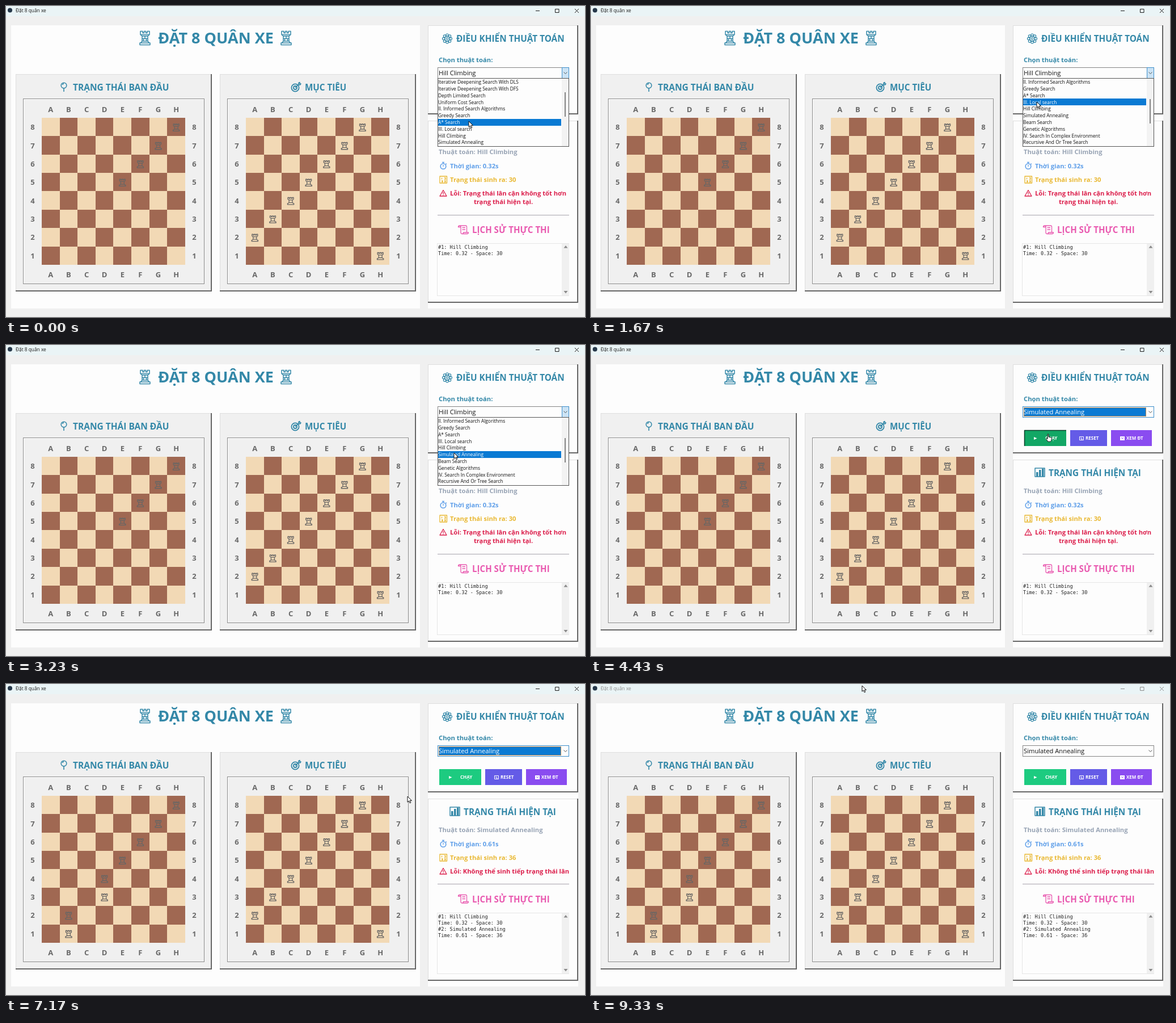
Write an HTML page with a canvas that moves like this. It is 1021 px wide and 548 px high and loops after 9.36 s.

```html
<!DOCTYPE html>
<html lang="vi">
<head>
<meta charset="utf-8">
<title>Đặt 8 quân xe</title>
<style>
html, body { margin: 0; width: 100%; height: 100%; overflow: hidden; background: #f0f0f0; }
canvas { display: block; }
</style>
</head>
<body>
<canvas id="stage" width="1021" height="548"></canvas>
<script>
const ctx = document.getElementById('stage').getContext('2d');
const LOOP = 9360, SCROLL = 520, PICK = 3560, HOVER = 4150, PRESS = 4360, RUN = 4500, DONE = 5110, LEAVE = 4900, BLUR = 9200;
const SANS = '"Open Sans", "Noto Sans", sans-serif', MONO = '"DejaVu Sans Mono", monospace';
const TEAL = '#3488a8', WHITE = '#fdfdfd', GREY = '#f0f0f0', BLUE = '#0a7ad3', PINK = '#e95ab0';

const ITEMS = ['Iterative Deepening Search With DLS', 'Iterative Deepening Search With DFS',
  'Depth Limited Search', 'Uniform Cost Search', 'II. Informed Search Algorithms', 'Greedy Search',
  'A* Search', 'III. Local search', 'Hill Climbing', 'Simulated Annealing', 'Beam Search',
  'Genetic Algorithms', 'IV. Search In Complex Environment', 'Recursive And Or Tree Search'];
const ROW = 11.78, LIST_TOP = 128.1;

// Column of the rook in each rank, from rank 8 down
const START = [7, 6, 5, 4, 3, 3, 1, 1], GOAL = [6, 5, 4, 3, 2, 1, 0, 7];

// Pointer tip: time, x, y
const POINTER = [[0, 816, 203], [560, 816, 203], [1300, 786, 169], [1750, 786, 169], [2900, 790, 190],
  [3600, 790, 190], [4200, 806, 157], [4600, 806, 157], [5350, 829, 220], [5900, 829, 220],
  [6900, 708, 198], [7900, 708, 198], [9150, 478, 3], [LOOP, 478, 3]];

const ROOK = 'M-5-6h2.2v1.6h1.7v-1.6h2.2v1.6h1.7v-1.6h2.2v3l-2 1.4v4.6l1.6 1.4h1v2h-11.2v-2h1l1.6-1.4v-4.6l-2-1.4z' +
  'M-3-1.6h6M-3 3h6';
const TOWER = 'M-8-12h4v3h2.5v-3h3v3h2.5v-3h4v6l-3 2.5v9l2.5 3h1.5v3.5h-18v-3.5h1.5l2.5-3v-9l-3-2.5z' +
  'M-7-6h14M-5-3.5h10M-5 1h10M-5 5.5h10M0-3.5v4.5M-2.5 1v4.5M2.5 1v4.5M-7 8.5h14';
const SCROLL_ICON = 'M800-7.5h10.5q2 0 2 2v10M800-7.5q-2.5 0-2.5 2.5h4.5v9.5q0 2.5 2.5 2.5h8.5q2.5 0 2.5-2.5h-9' +
  'q0 2.5-2 2.5M800-7.5q2 0 2 2.5M804.5-4h5.5M804.5-.5h5.5';
const ARROW = 'M0 0v10.2l2.4-2.2 1.7 3.8 1.8-.8-1.7-3.6h3.2z';
const HAND = 'M-.9.3q.9-1 1.8 0v4.6l4.6 1.2q1 .4.8 1.6l-.7 3.8-1.2 1.7h-4.6l-3.2-4.6q-.3-1.4 1-1.2l1.5 1.2z';

function box(x, y, w, h, color) {
  ctx.fillStyle = color;
  ctx.fillRect(x, y, w, h);
}

function outline(x, y, w, h, color) {
  ctx.strokeStyle = color;
  ctx.lineWidth = 1;
  ctx.strokeRect(x + .5, y + .5, w - 1, h - 1);
}

function text(s, x, middle, size, color, { weight = 700, align = 'left', family = SANS } = {}) {
  ctx.font = `${weight} ${size}px ${family}`;
  ctx.textAlign = align;
  ctx.fillStyle = color;
  ctx.fillText(s, x, middle + size * .357);
}

function shape(d, x, y, { stroke, fill, width = 1.3 }) {
  const path = new Path2D(d);
  ctx.save();
  ctx.translate(x, y);
  ctx.lineWidth = width;
  ctx.lineJoin = 'round';
  if (fill) { ctx.fillStyle = fill; ctx.fill(path); }
  if (stroke) { ctx.strokeStyle = stroke; ctx.stroke(path); }
  ctx.restore();
}

function ring(x, y, r, color, width = 1.4) {
  ctx.beginPath();
  ctx.arc(x, y, r, 0, 2 * Math.PI);
  ctx.strokeStyle = color;
  ctx.lineWidth = width;
  ctx.stroke();
}

function dot(x, y, r, color) {
  ctx.beginPath();
  ctx.arc(x, y, r, 0, 2 * Math.PI);
  ctx.fillStyle = color;
  ctx.fill();
}

function raised(x, y, w, h, face) {
  box(x, y, w, h, '#585858');
  box(x, y, w - 1, h - 1, '#747474');
  box(x, y, w - 2, h - 2, '#dedede');
  box(x + 1, y + 1, w - 3, h - 3, face);
}

function titleBar(active) {
  const ink = active ? '#1c1c1c' : '#8c8c8c';
  box(0, 0, 1021, 18, '#eaf4f6');
  dot(7, 7.5, 4, '#26384a');
  text('Đặt 8 quân xe', 17, 8.5, 8.35, ink, { weight: 400 });
  shape('M934 8.5h7M968.5 5.5h6.5v6h-6.5zM1003 5l7 7M1010 5l-7 7', 0, 0, { stroke: ink, width: 1 });
}

function board(left, rooks, shown) {
  const cw = 31.62, ch = 32.36, top = 197;
  raised(left - 46, 120, 346, 383, GREY);
  outline(left - 32, 164, 319, 326, '#fff');
  outline(left - 33, 163, 320, 327, '#8c8c8c');
  for (let r = 0; r < 8; r++) {
    const cy = top + (r + .5) * ch + .5, cx = left + (r + .5) * cw;
    for (let c = 0; c < 8; c++) {
      const x = Math.round(left + c * cw), y = Math.round(top + r * ch);
      box(x, y, Math.round(left + (c + 1) * cw) - x, Math.round(top + (r + 1) * ch) - y,
        (r + c) % 2 ? '#a06852' : '#f2d9b5');
    }
    for (const x of [left - 16, left + 269]) text(8 - r, x, cy, 13, '#696969', { align: 'center' });
    for (const y of [182, 473]) text('ABCDEFGH'[r], cx, y, 13, '#696969', { align: 'center' });
  }
  rooks.slice(0, shown).forEach((c, r) =>
    shape(ROOK, left + (c + .5) * cw, top + (r + .5) * ch + .8, { stroke: '#686664' }));
}

function mainPanel(t) {
  box(9, 34, 721, 499, WHITE);
  for (const x of [245, 494]) shape(TOWER, x, 56.5, { stroke: TEAL, width: 1.5 });
  text('ĐẶT 8 QUÂN XE', 370, 56.5, 27, TEAL, { align: 'center' });
  const steps = Math.max(0, Math.min(4, Math.floor((t - RUN) / (DONE - RUN) * 4)));
  board(63, START, 4 + steps);
  board(423, GOAL, 8);
  ring(102, 140, 4.8, TEAL, 1.6);
  shape('M102 145v6M99.5 139q.5-2 2.5-2.2', 0, 0, { stroke: TEAL, width: 1.6 });
  text('TRẠNG THÁI BAN ĐẦU', 118, 143.5, 15.5, TEAL);
  ring(510, 144, 6.6, TEAL, 1.8);
  ring(510, 144, 3, TEAL, 1.8);
  shape('M510 144l6-6v-2.5l2-1v2.5h2l-1.5 2H516', 0, 0, { stroke: TEAL, width: 1.6 });
  text('MỤC TIÊU', 527, 143.5, 15.2, TEAL);
}

function gear() {
  for (let i = 0; i < 8; i++) {
    const a = i * Math.PI / 4;
    ring(778 + 6.3 * Math.cos(a), 57.5 + 6.3 * Math.sin(a), 2.2, TEAL, 1.2);
  }
  ring(778, 57.5, 4.6, TEAL, 1.4);
  ring(778, 57.5, 1.8, TEAL, 1.2);
}

function combo(t) {
  const open = t < PICK, focused = !open && t < BLUR;
  box(761, 108, 232, 20, WHITE);
  outline(761, 108, 232, 20, focused ? '#3f8fca' : '#858585');
  if (focused) {
    box(763, 110, 216, 16, BLUE);
    outline(763, 110, 216, 16, '#b98b57');
  }
  if (open) {
    box(980, 108, 13, 20, '#cbe3f5');
    outline(980, 108, 13, 20, '#3f8fca');
  }
  shape('M983.5 116.5l3 3 3-3', 0, 0, { stroke: '#555', width: 1 });
  text(open ? 'Hill Climbing' : 'Simulated Annealing', 763, 118.5, 11.2, focused ? '#fff' : '#111', { weight: 400 });
}

function button(x, w, color, label, labelX) {
  box(x, 150, w, 28, color);
  text(label, labelX, 164.5, 8, '#fff');
}

function controls(t) {
  raised(744, 34, 265, 157, WHITE);
  gear();
  text('ĐIỀU KHIỂN THUẬT TOÁN', 794, 57.5, 15.35, TEAL);
  text('Chọn thuật toán:', 763, 95, 11.25, TEAL);
  combo(t);
  button(764, 74, t >= HOVER && t < LEAVE ? '#12a765' : '#1dcb80', 'CHẠY', 801);
  if (t >= PRESS && t < RUN) shape('M764.5 178v-27.5h73.5', 0, 0, { stroke: '#0b3d28', width: 1.5 });
  shape('M781 162l5.5 2.5-5.5 2.5z', 0, 0, { fill: '#fff' });
  button(845, 65, '#645be7', 'RESET', 872);
  shape('M861.5 161.5h7v6h-7zM863 164h3M864 166h3', 0, 0, { stroke: '#fff', width: 1 });
  button(917, 72, '#8a4cf0', 'XEM ĐT', 944);
  shape('M933 161h8v7h-8z', 0, 0, { fill: '#fff' });
  shape('M935 163l2 2 2-2', 0, 0, { stroke: '#8a4cf0', width: 1 });
}

function statusIcons() {
  shape('M783 217h17v15h-17z', 0, 0, { stroke: TEAL, width: 1.5 });
  shape('M785 224h3.5v8H785zM790 220h3.5v12H790zM795 218h3.5v14H795z', 0, 0, { fill: TEAL });
  const blue = '#5f9fe9', gold = '#e9b832', red = '#dc1f4c';
  ring(771, 282.5, 4.8, blue, 1.6);
  shape('M771 283v-3M769 275.5h4M771 275.5v2M775.5 277.5l1.5 1.5', 0, 0, { stroke: blue });
  shape('M765 300h12.5v12h-12.5z', 0, 0, { stroke: gold });
  shape('M768.5 302.5v3M773 302.5h2v3h-2M768 308h2v2h-2M773 308h2v2h-2', 0, 0, { stroke: gold });
  shape('M771 324.5l6 10.5h-12zM771 328v3.5M771 332.5v1.3', 0, 0, { stroke: red });
  return { blue, gold, red };
}

function status(t) {
  const done = t >= DONE, shift = done ? -15.5 : 0, size = 11.2;
  raised(744, 202, 265, 321, WHITE);
  const { blue, gold, red } = statusIcons();
  text('TRẠNG THÁI HIỆN TẠI', 807, 225.5, 15.35, TEAL);
  text('Thuật toán: ' + (done ? 'Simulated Annealing' : 'Hill Climbing'), 763, 257.5, size, '#98a4b5');
  text(`Thời gian: ${done ? '0.61' : '0.32'}s`, 783, 282, size, blue);
  text(`Trạng thái sinh ra: ${done ? 36 : 30}`, 783, 306, size, gold);
  if (done) {
    ctx.save();
    ctx.beginPath();
    ctx.rect(761, 318, 233, 26);
    ctx.clip();
    text('Lỗi: Không thể sinh tiếp trạng thái lân', 783, 330.5, size, red);
    ctx.restore();
  } else {
    text('Lỗi: Trạng thái lân cận không tốt hơn', 783, 330.5, size, red);
    text('trạng thái hiện tại.', 877, 345.5, size, red, { align: 'center' });
  }
  box(761, Math.round(367.5 + shift), 232, 1, '#a7a3ad');

  const y = 394.5 + shift;
  shape(SCROLL_ICON, 0, y, { stroke: PINK });
  text('LỊCH SỬ THỰC THI', 822, y + .5, 15.1, PINK);
  history(done, Math.round(418 + shift));
}

function history(done, top) {
  box(760, top, 233, 511 - top, '#e6e6e6');
  box(761, top + 1, 219, 509 - top, WHITE);
  box(980, top + 1, 13, 509 - top, '#f0f0f0');
  shape('M983.5 2.5l3.5-4.5 3.5 4.5z', 0, top + 6, { fill: '#8a8a8a' });
  shape('M983.5-2.5l3.5 4.5 3.5-4.5z', 0, 504.5, { fill: '#8a8a8a' });
  const lines = ['#1: Hill Climbing', 'Time: 0.32 - Space: 30'];
  if (done) lines.push('#2: Simulated Annealing', 'Time: 0.61 - Space: 36');
  lines.forEach((s, i) => text(s, 762, top + 6.5 + i * 11, 8.57, '#222', { weight: 400, family: MONO }));
}

function dropdown(t, pointerY) {
  const first = t < SCROLL ? 0 : 4;
  const selected = Math.floor((pointerY - LIST_TOP) / ROW);
  box(761, 127, 232, 121, '#555');
  box(762, 128, 230, 119, WHITE);
  box(980, 128, 12, 119, '#f3f3f3');
  box(985, first ? 164 : 152, 2, 43, '#858585');
  ITEMS.slice(first, first + 10).forEach((item, i) => {
    if (i === selected) box(762, Math.round(LIST_TOP + i * ROW), 217, 12, BLUE);
    text(item, 762, 134.3 + i * ROW, 8.35, i === selected ? '#fff' : '#111', { weight: 400 });
  });
}

function pointerAt(t) {
  const i = POINTER.findIndex(p => p[0] > t);
  const [t0, x0, y0] = POINTER[i - 1], [t1, x1, y1] = POINTER[i];
  const u = (t - t0) / (t1 - t0), e = u * u * (3 - 2 * u);
  return [x0 + (x1 - x0) * e, y0 + (y1 - y0) * e];
}

function draw(now) {
  const t = now % LOOP, [x, y] = pointerAt(t);
  box(0, 0, 1021, 548, GREY);
  titleBar(t < BLUR);
  mainPanel(t);
  box(744, 34, 265, 499, WHITE);
  controls(t);
  status(t);
  if (t < PICK) dropdown(t, y);
  shape(t >= HOVER && t < LEAVE ? HAND : ARROW, x, y, { fill: '#fff', stroke: '#111', width: 1 });
  requestAnimationFrame(draw);
}
requestAnimationFrame(draw);
</script>
</body>
</html>
```
